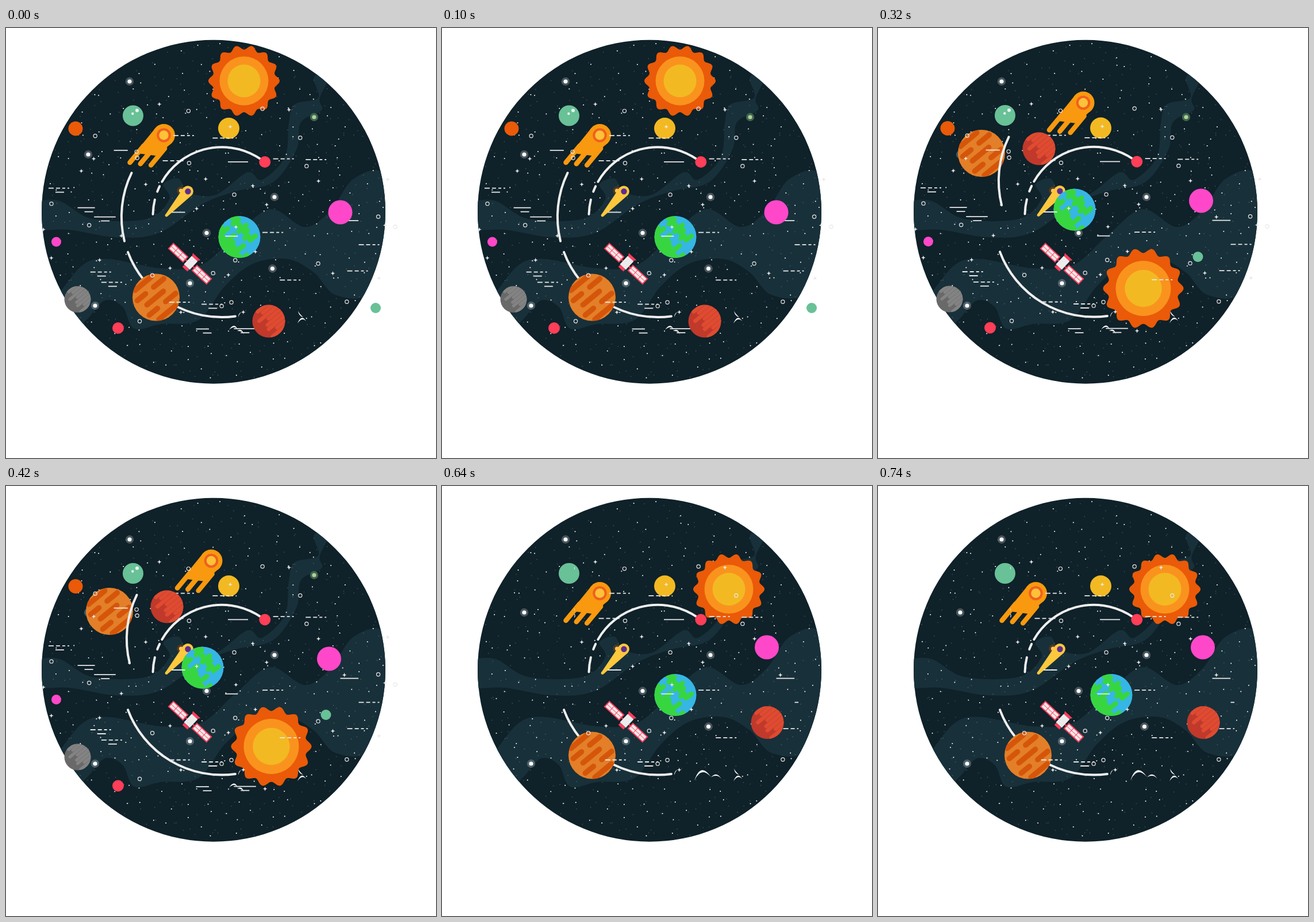
These frames come from a looping animation (748x748 px, 0.8 s). An HTML page with a canvas:

```html
<!DOCTYPE html>
<html>
<head>
<meta charset="utf-8">
<style>
html, body { margin: 0; width: 100%; height: 100%; overflow: hidden; background: #fff; }
canvas { display: block; width: 100vw; height: 100vh; }
</style>
</head>
<body>
<canvas id="stage" width="748" height="748"></canvas>
<script>
const ctx = document.getElementById('stage').getContext('2d');
const TAU = Math.PI * 2, STEP = 160, PALE = '#e9e9e9';

// view: scale, dx, dy of the travelling layer; clip: visible part of its line work
const home = { view: [1, 0, 0], clip: [0, 0, 748, 748], jupiter: [261, 468.5], earth: [406, 363.5],
  sat: [320, 410], fire: [274.5, 186.5], swing: [0, 0] };
const poses = [
  { sun: [414, 92, 62], mars: [457, 510], pink: [581.5, 320.5], mint: [643, 487] },
  { view: [.905, 2.8, 28.6], clip: [127.5, 170, 748, 748], sun: [168.5, 331, 63], jupiter: [293.5, 107],
    mars: [206, 482], earth: [433, 345], fire: [447, 118], sat: [394.5, 475], pink: [513, 389] },
  { view: [1, 0, -.5], sun: [461.5, 453, 70], jupiter: [180, 218], mars: [280, 210], earth: [342, 316],
    fire: [357, 130], pink: [562, 300.5], mint: [556.5, 398], swing: [9, -62] },
  { view: [1, .7, -.7], clip: [0, 0, 748, 509], sun: [507.5, 186.5, 70], mars: [456, 484],
    fire: [357.7, 129.5], pink: [562.5, 300], mint: [557, 397.5] },
  { view: [1, 0, -.5], clip: [230, 0, 620, 505], sun: [499, 179.5, 62], mars: [566, 411.5], pink: [565, 280.5] }
].map(pose => ({ ...home, ...pose }));

// key points of the two cloud bands
const upperBand = [40,310, 90,300, 150,332, 245,332, 284,298, 274,272, 300,262, 318,286, 365,290, 420,251, 445,264,
  485,225, 492,165, 502,133, 543,121, 536,85, 570,70, 546,121, 549,143, 513,164, 505,212, 465,268, 400,284, 340,307,
  265,357, 190,364, 110,351, 40,349];
const lowerBand = [70,490, 95,458, 135,411, 180,402, 270,418, 340,412, 400,360, 460,315, 520,346, 565,317, 605,262,
  660,254, 690,350, 640,458, 575,465, 535,425, 490,402, 430,410, 380,450, 335,508, 270,515, 223,523, 203,485, 172,474,
  140,508, 110,530];

const smallPlanets = [ // x, y, r, colour, steps in which it shows
  [121, 175, 12.5, '#ea5a08', '0123'], [387.5, 174.5, 18.5, '#f3b922', '01234'], [221, 152.5, 18, '#69c197', '01234'],
  [87.5, 372, 8.5, '#ff48c9', '023'], [195, 522, 10, '#ff3e58', '012'], [450.3, 233, 10, '#ff3e58', '01234']];

let seed = 7;
const random = () => (seed = seed * 16807 % 2147483647) / 2147483647;

// one jittered point per grid cell, kept inside an ellipse
function scatter(gap, cx, cy, rx, ry) {
  const points = [];
  for (let x = cx - rx; x < cx + rx; x += gap)
    for (let y = cy - ry; y < cy + ry; y += gap) {
      const px = x + random() * gap, py = y + random() * gap;
      if (Math.hypot((px - cx) / rx, (py - cy) / ry) < 1) points.push([px, py]);
    }
  return points;
}
const stars = scatter(32, 361, 320, 296, 296), dust = scatter(23, 361, 320, 296, 296);
const [rings, sparkles, dashSpots] = [108, 92, 92].map(gap => scatter(gap, 375, 328, 318, 215));

// speed lines: one solid stroke or a row of shrinking dashes, sometimes with a second stroke below
const dashes = dashSpots.flatMap(([x, y]) => {
  const lines = [];
  if (random() < .5) lines.push([x, y, x + 16 + random() * 28, y]);
  else for (let i = 0, left = x; i < 4; left += 13 - 2 * i++) lines.push([left, y, left + 9 - 2 * i, y]);
  if (random() < .4) lines.push([x + 12, y + 7, x + 27, y + 7]);
  return lines;
});

function disc(x, y, r, color) {
  ctx.fillStyle = color;
  ctx.beginPath();
  ctx.arc(x, y, r, 0, TAU);
  ctx.fill();
}

function polygon(points, color) {
  ctx.fillStyle = color;
  ctx.beginPath();
  for (let i = 0; i < points.length; i += 2) ctx.lineTo(points[i], points[i + 1]);
  ctx.fill();
}

function segment(x1, y1, x2, y2) {
  ctx.beginPath();
  ctx.moveTo(x1, y1);
  ctx.lineTo(x2, y2);
  ctx.stroke();
}

function pen(color, width, cap = 'round') {
  ctx.strokeStyle = color;
  ctx.lineWidth = width;
  ctx.lineCap = cap;
}

function at([x, y], scale, draw) {
  ctx.save();
  ctx.translate(x, y);
  ctx.scale(scale, scale);
  draw();
  ctx.restore();
}

// smooth closed curve through all points
function blob(p, color) {
  const n = p.length, get = i => p[(i + n) % n];
  ctx.fillStyle = color;
  ctx.beginPath();
  ctx.moveTo(p[0], p[1]);
  for (let i = 0; i < n; i += 2) {
    const lead = k => get(i + k) + (get(i + 2 + k) - get(i - 2 + k)) / 6;
    const trail = k => get(i + 2 + k) - (get(i + 4 + k) - get(i + k)) / 6;
    ctx.bezierCurveTo(lead(0), lead(1), trail(0), trail(1), get(i + 2), get(i + 3));
  }
  ctx.fill();
}

// rows of diagonal strokes on a unit disc; spans(row) gives start and end of each stroke
function planet(pos, r, base, markColor, rows, spans) {
  at(pos, r, () => {
    disc(0, 0, 1, base);
    ctx.clip();
    ctx.rotate(-.69);
    const gap = 2 / rows;
    pen(markColor, Math.min(gap * 1.08, .23));
    for (let i = 0; i < rows; i++)
      for (const [from, to] of spans(i)) segment(from, (i + .5) * gap - 1, to, (i + .5) * gap - 1);
  });
}
const cratered = i => [[-.15 + .3 * Math.sin(i * 2.4), 1.2]];
const continents = i => [[-1.2, -.35 + .25 * Math.sin(i * 2.4)], ...(i < 7 ? [[.3 - .15 * (i % 2), .62 - .12 * (i % 3)]] : [])];
const stripes = i => i % 2 ? [[-.7, -.25], [.2, .75]] : [[-.5, .4]];

function backdrop() {
  ctx.save();
  disc(361, 319.8, 299, '#0f2129');
  ctx.clip();
  blob(upperBand, '#18303a');
  blob(lowerBand, '#18303a');
  dust.forEach(([x, y]) => disc(x, y, .8, 'rgba(255,255,255,.25)'));
  stars.forEach(([x, y]) => disc(x, y, 1, '#fff'));
  ctx.restore();
  const glow = (x, y, core, halo) => { disc(x, y, 7.2, halo); disc(x, y, 3.6, core); };
  [[215, 93], [143, 220], [467, 294], [349, 356.5], [320, 444], [463.5, 418.5], [155, 483]]
    .forEach(([x, y]) => glow(x, y, '#fff', 'rgba(255,255,255,.24)'));
  glow(536, 155, '#a9d49a', '#42624e');
  glow(304.5, 283, '#fcc35c', '#55391f');
}

function sun(x, y, R) {
  ctx.fillStyle = '#ea5a08';
  ctx.beginPath();
  for (let a = 0; a < TAU; a += .02) {
    const r = R * (.94 + .06 * Math.cos(14 * a));
    ctx.lineTo(x + r * Math.cos(a), y + r * Math.sin(a));
  }
  ctx.fill();
  disc(x, y, R * .685, '#f9931e');
  disc(x, y, R * .46, '#f3b922');
}

function orbit(x, y, r, from, to) {
  pen('#efefef', 4);
  ctx.beginPath();
  ctx.arc(x, y, r, from * TAU / 360, to * TAU / 360);
  ctx.stroke();
}
const innerOrbit = (from, to) => orbit(375.3, 327, 119.8, from, to);
const outerOrbit = (from, to) => orbit(375.5, 328.5, 174.6, from, to);

function crescent(x1, y1, cx, cy, x2, y2, depth = 5) {
  ctx.fillStyle = '#fff';
  ctx.beginPath();
  ctx.moveTo(x1, y1);
  ctx.quadraticCurveTo(cx, cy, x2, y2);
  ctx.quadraticCurveTo(cx + 1, cy + depth, x1, y1);
  ctx.fill();
}

function birds(step) {
  if (step < 3) {
    crescent(388, 525, 398, 510, 404, 527);
    crescent(402, 527, 411, 521, 414, 534);
  }
  crescent(439, 513, 450, 480, 468, 507, 7);
  crescent(468, 507, 478, 496, 486, 510);
  crescent(508, 492, 509, 501, 517, 503, -4);
  crescent(507, 514, 514, 497, 522, 510);
  crescent(404, 503, 404, 497, 409, 494, 2);
}

function comet() {
  const yellow = '#fdc83d';
  polygon([309, 277.5, 277, 325, 280.5, 328, 323, 291], yellow);
  disc(279, 326, 2.4, yellow);
  disc(316.3, 284, 9.6, yellow);
  disc(316.5, 284.3, 5.2, '#5f2c91');
}

function fireball() {
  const orange = '#f8990f';
  polygon([-15, -12, -50, 31, -34, 33, -11, 36, 15, 12], orange);
  pen(orange, 8.5);
  for (let i = 0; i < 3; i++) segment(-59 + 18.3 * i, 47.5 + 2.3 * i, -35 + 18.3 * i, 18.5 + 2.3 * i);
  disc(0, 0, 19.5, orange);
  disc(0, 0, 12.3, '#f0601f');
  disc(0, 0, 8.2, '#fcc238');
}

function satellite() {
  const red = '#fb3d5c', rect = (color, ...box) => { ctx.fillStyle = color; ctx.fillRect(...box); };
  ctx.rotate(.75);
  rect(red, -12, -1, 24, 2);
  for (const left of [-46, 10]) {
    rect(red, left, -7, 36, 14);
    for (let cell = 0; cell < 6; cell++)
      rect('#f4e6e8', left + 2 + (cell >> 1) * 11, -5 + cell % 2 * 5.4, 10, 4.6);
  }
  polygon([-9, -17, 9, -17, 5, -10, -5, -10], red);
  rect('#ececec', -7, -12, 14, 20);
  rect(red, -6, 8, 12, 5);
}

function details() {
  pen(PALE, 1.2);
  for (const [x, y] of rings) {
    ctx.beginPath();
    ctx.arc(x, y, 3.1, 0, TAU);
    ctx.stroke();
  }
  for (const spot of sparkles)
    at(spot, 1, () => polygon([0, -3.8, 1, -1, 3.8, 0, 1, 1, 0, 3.8, -1, 1, -3.8, 0, -1, -1], PALE));
  pen(PALE, 1.8, 'butt');
  dashes.forEach(line => segment(...line));
  disc(228, 143.5, 3, '#e8f5ee');
  disc(220.3, 149, 2.2, '#e8f5ee');
}

function draw(step) {
  const p = poses[step], [scale, dx, dy] = p.view;
  const layer = content => at([dx, dy], scale, content);
  ctx.clearRect(0, 0, 748, 748);
  backdrop();
  layer(() => birds(step));
  sun(...p.sun);
  layer(() => {
    innerOrbit(209.8, 308.6);
    innerOrbit(200.7, 205.5);
    innerOrbit(181.4, 193.7);
    outerOrbit(82.3, 159.4);
    comet();
    for (const [x, y, r, color, steps] of smallPlanets)
      if (steps.includes(step)) disc(x, y, r, color);
    if (step < 4) planet([124.5, 472], 23, '#696969', '#838383', 8, cratered);
  });
  planet(p.earth, 36.5 * scale, '#36b6e4', '#37d63f', 9, continents);
  planet(p.jupiter, 41 * scale, '#e37f28', '#d5560a', 5, stripes);
  if (p.mint) disc(...p.mint, 9, '#69c197');
  if (step < 4) layer(() => {
    ctx.translate(...p.swing);
    outerOrbit(166, 206);
  });
  at(p.fire, scale, fireball);
  at(p.sat, scale, satellite);
  layer(() => {
    const [x1, y1, x2, y2] = p.clip;
    ctx.beginPath();
    ctx.rect(x1, y1, x2 - x1, y2 - y1);
    ctx.clip();
    details();
  });
  planet(p.mars, 28.5 * scale, '#c0392b', '#de4b31', 8, cratered);
  disc(...p.pink, 21 * scale, '#ff48c9');
}

let shown = -1;
const start = performance.now();
function tick() {
  const step = Math.floor((performance.now() - start) / STEP) % poses.length;
  if (step !== shown) draw(shown = step);
  requestAnimationFrame(tick);
}
tick();
</script>
</body>
</html>
```
